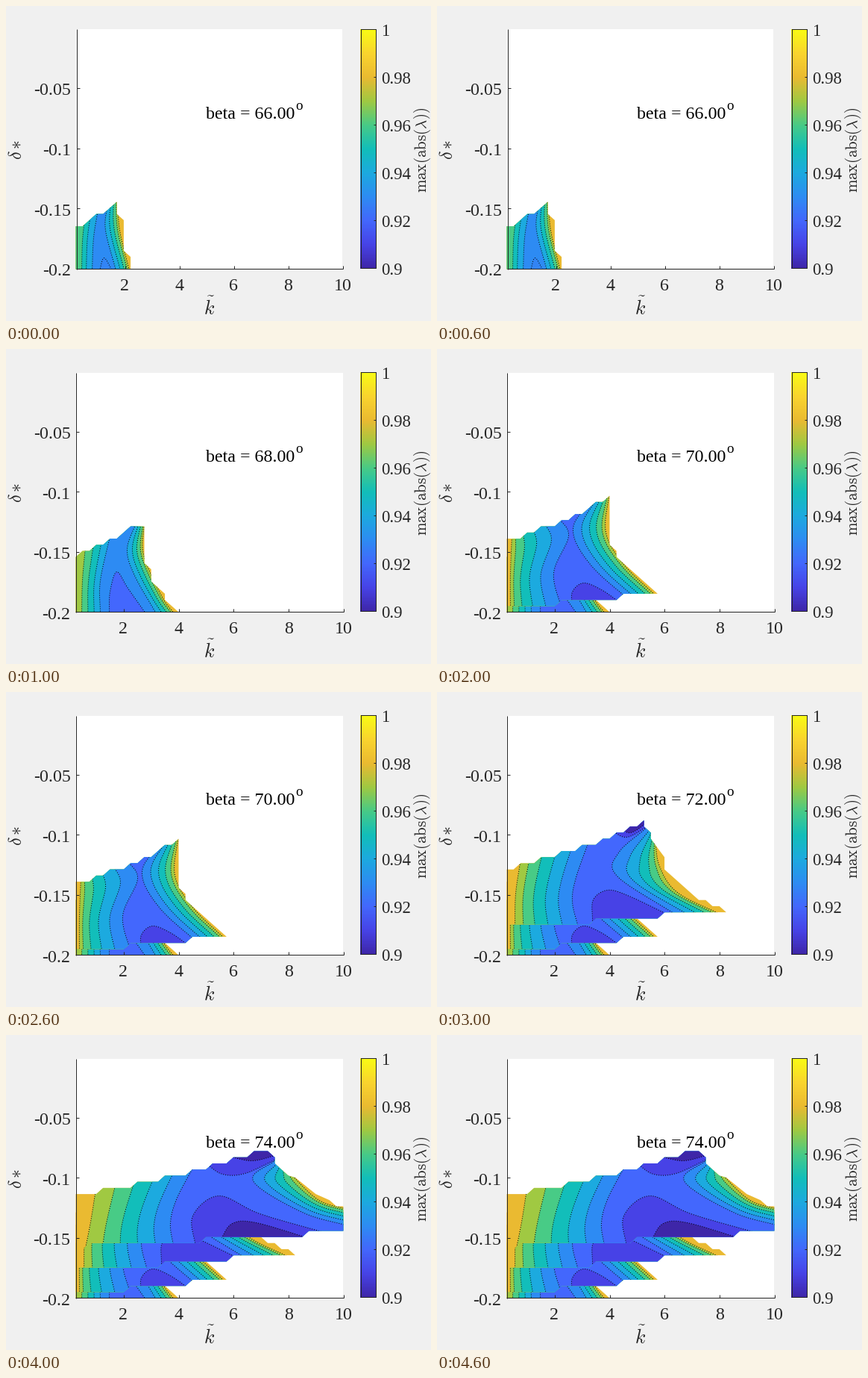
Recreate the animation shown at these times as a matplotlib script. Size 570x422 px, loop 5 s.

```python
import numpy as np
import matplotlib.pyplot as plt
from matplotlib.animation import FuncAnimation
from matplotlib.colors import LinearSegmentedColormap
from matplotlib.patches import Polygon, Rectangle

W, H, DPI = 570, 422, 64
PT = 72 / DPI                       # points per pixel
INK = "#262626"
plt.rcParams["mathtext.fontset"] = "cm"

parula = LinearSegmentedColormap.from_list("parula", (
    "#3e26a8 #4743e7 #4367fd #2d8cf3 #1caadf #12beb9 "
    "#48cb86 #9fc942 #eaba31 #fad42e #f9fb15").split(), N=256)


def shade(v):
    return parula((v - .9) / .1)


def stairs(row, steps, last):
    """Grid points that climb one row at each column in steps."""
    col = np.arange(last + 1)
    return np.column_stack([col, row + np.searchsorted(steps, col, "right")])


def smooth(pts, n=80):
    """Catmull-Rom curve through pts, resampled evenly along its length."""
    p = np.array(pts, float)
    p = np.vstack([2 * p[0] - p[1], p, 2 * p[-1] - p[-2]])
    t = np.linspace(0, 1, 20)[:, None]
    q = np.vstack([b + t / 2 * (c - a + t * (2 * a - 5 * b + 4 * c - d
                                             + t * (3 * (b - c) + d - a)))
                   for a, b, c, d in zip(p, p[1:], p[2:], p[3:])])
    s = np.r_[0, np.cumsum(np.hypot(*np.diff(q, axis=0).T))]
    u = np.linspace(0, s[-1], n)
    return np.column_stack([np.interp(u, s, q[:, 0]), np.interp(u, s, q[:, 1])])


def family(outer, inner, n, power):
    a, b = smooth(outer), smooth(inner)
    return [a + (b - a) * t ** power for t in np.linspace(0, 1, n)]


def sublevel(curves):
    """Closed polygon: curves run on vertically past the outline."""
    first, last = curves[0], curves[-1]
    pocket = len(curves) == 1 and first[len(first) // 2][1] > first[0][1]
    end = 0 if pocket else 430
    body = [first]
    if len(curves) == 2:
        body += [[(first[-1][0], 0), (last[0][0], 0)], last]
    return np.vstack([[(first[0][0], end)], *body, [(last[-1][0], end)]])


class Region:
    """Stepped outline on the grid, filled with nested sublevel sets."""

    def __init__(self, top, edge, bottom, left, right, n_left, n_right,
                 power, extra=()):
        grid = np.vstack([stairs(*top), edge, stairs(*bottom)[::-1]])
        self.outline = np.array([93, 352]) + grid * np.array([9.2, -8.2])
        beyond = np.array([(60, 430), (60, 0)])
        lefts = ([beyond] * (n_right - n_left)
                 + family(*left, n_left, power))
        rights = family(*right, n_right, 1.4)
        self.sets = [(.98 - .01 * k, pair)
                     for k, pair in enumerate(zip(lefts, rights))]
        self.sets += [(v, (smooth(c),)) for v, c in extra]

    def draw(self, z):
        base = ax.add_patch(Polygon(self.outline, fc=shade(.98), lw=0,
                                    zorder=z))
        for k, (v, curves) in enumerate(self.sets):
            fill = ax.add_patch(Polygon(sublevel(curves), fc=shade(v - .01),
                                        lw=0, zorder=z + .02 * (k + 1)))
            fill.set_clip_path(base)
            for c in curves:
                dots, = ax.plot(*c.T, color="black", lw=PT, ls=(0, (1, 2)),
                                dash_capstyle="butt", zorder=z + .5)
                dots.set_clip_path(base)


beta66 = Region(
    (7, [2, 3, 5, 6], 6), [(6, 9), (7, 8), (7, 3), (8, 2)], (0, [], 8),
    ([(101, 354), (102, 315), (105, 285)],
     [(115, 354), (117, 310), (123, 272)]),
    ([(149, 255), (152, 300), (165, 354)],
     [(135, 268), (133, 300), (147, 354)]), 3, 5, 1.2,
    [(.938, [(125, 354), (131, 337), (142, 354)])])

beta68 = Region(
    (9, [1, 3, 5, 7, 8], 10), [(10, 8), (11, 7), (11, 5), (13, 3), (13, 2)],
    (0, [], 15),
    ([(101, 354), (102, 310), (106, 264)],
     [(126, 354), (126, 310), (140, 246)]),
    ([(185, 232), (184, 275), (208, 330), (225, 354)],
     [(174, 232), (162, 268), (172, 303), (201, 354)]), 4, 5, 1,
    [(.93, [(138, 354), (139, 325), (148, 298), (163, 320), (187, 354)])])

beta70 = Region(
    (12, [3, 5, 8, 10, 12, 13, 15], 15), [(15, 11), (16, 10), (16, 9)],
    (1, [8, 17], 22),
    ([(98, 352), (98, 300), (100, 248)],
     [(168, 352), (156, 300), (176, 250), (162, 225)]),
    ([(231, 190), (226, 245), (250, 288), (293, 330)],
     [(211, 198), (182, 240), (205, 288), (262, 340)]), 6, 6, 1.6,
    [(.92, [(181, 345), (181, 325), (196, 313), (220, 322), (246, 340)])])

beta72 = Region(
    (14, [2, 5, 8, 11, 14, 16, 18, 20], 20),
    [(20, 21), (21, 20), (21, 19), (23, 16), (23, 14), (28, 9), (29, 9),
     (30, 8), (31, 8)], (5, [13, 23], 32),
    ([(104, 315), (105, 270), (112, 222)],
     [(189, 315), (181, 280), (186, 248), (204, 197)]),
    ([(292, 195), (298, 233), (322, 268), (381, 298)],
     [(281, 181), (243, 215), (241, 246), (320, 298)]), 6, 6, 1.25,
    [(.92, [(208, 306), (209, 278), (228, 265), (255, 272), (310, 298)]),
     (.92, [(232, 184), (254, 194), (284, 178)]),
     (.91, [(244, 180), (259, 188), (284, 173)])])

beta74 = Region(
    (17, [4, 9, 13, 17, 20, 23, 26], 28),
    [(29, 23), (29, 22), (31, 20), (32, 19.7), (35, 17), (37, 16), (38, 15),
     (39, 15)], (8, [2, 19, 34], 39),
    ([(105, 290), (113, 250), (120, 206)],
     [(224, 282), (220, 252), (228, 220), (252, 174)]),
    ([(374, 178), (418, 220), (462, 234)],
     [(361, 167), (331, 195), (397, 237), (462, 256)]), 6, 6, 1,
    [(.92, [(254, 284), (250, 242), (285, 215), (340, 239), (430, 265)]),
     (.92, [(268, 172), (290, 186), (320, 185), (364, 165)]),
     (.91, [(287, 274), (303, 252), (335, 251), (410, 273)]),
     (.91, [(298, 162), (330, 168), (364, 160)])])

regions = [beta66, beta68, beta70, beta72, beta74]


def line(xs, ys):
    ax.plot(xs, ys, color=INK, lw=PT, solid_capstyle="butt", zorder=8)


def label(x, y, s, size, ha="left", color=INK, **kw):
    ax.text(x, y, s, size=size * PT, ha=ha, va="baseline", color=color,
            family="Liberation Serif", zorder=9, **kw)


def draw_axes(left, top, right, x2, dx, y05, dy):
    ax.add_patch(Rectangle((left - .5, top - .5), right - left, 352.5 - top,
                           fc="white", lw=0, zorder=0))
    line([left, left], [top - .5, 352.5])
    line([left - .5, right + .5], [352, 352])
    for k in range(5):
        x = x2 + dx * k
        line([round(x)] * 2, [352, 348])
        label(x, 381, str(2 * k + 2), 24, "center")
    for k, s in enumerate(["-0.05", "-0.1", "-0.15", "-0.2"]):
        y = y05 + dy * k
        line([left, left + 4], [round(y)] * 2)
        label(left - 7, y + 9, s, 24, "right")
    label(272, 414, r"$\tilde{k}$", 26, "center")
    label(22, 191.5, r"$\tilde{\delta}*$", 24, "center", rotation=90,
          rotation_mode="anchor")


def draw_colorbar():
    ax.imshow(np.linspace(1, 0, 256)[:, None], cmap=parula, aspect="auto",
              extent=(474.5, 495.5, 351.5, 30.5), interpolation="nearest")
    line([475, 495, 495, 475, 475], [31, 31, 351, 351, 31])
    for k in range(6):
        y = 351 - 64 * k
        line([492, 495], [y, y])
        label(503, y + 9, f"{.9 + .02 * k:.2g}", 22.7)
    label(564, 192, r"$\mathrm{max(abs(}\lambda\mathrm{))}$", 21, "center",
          rotation=90, rotation_mode="anchor")


def draw(i):
    ax.clear()
    ax.axis("off")
    if i == 0:
        draw_axes(94, 31, 451, 159, 73, 110, 80.6)
    else:
        draw_axes(93, 32, 452, 157, 73.75, 111, 80.4)
    draw_colorbar()
    for z in range(min(i, 1), i + 1):
        regions[z].draw(z + 1)
    label(268, 151, f"beta = {66 + 2 * i:.2f}", 24, color="black")
    label(388, 139, "o", 19, color="black")
    # integer coordinates fall on pixel centres
    ax.set(xlim=(-.5, W - .5), ylim=(H - .5, -.5))


fig = plt.figure(figsize=(W / DPI, H / DPI), dpi=DPI, facecolor="#f0f0f0")
ax = fig.add_axes([0, 0, 1, 1])
anim = FuncAnimation(fig, draw, frames=5, interval=1000, repeat=True,
                     repeat_delay=0, init_func=lambda: None, blit=False)
plt.show()
```
